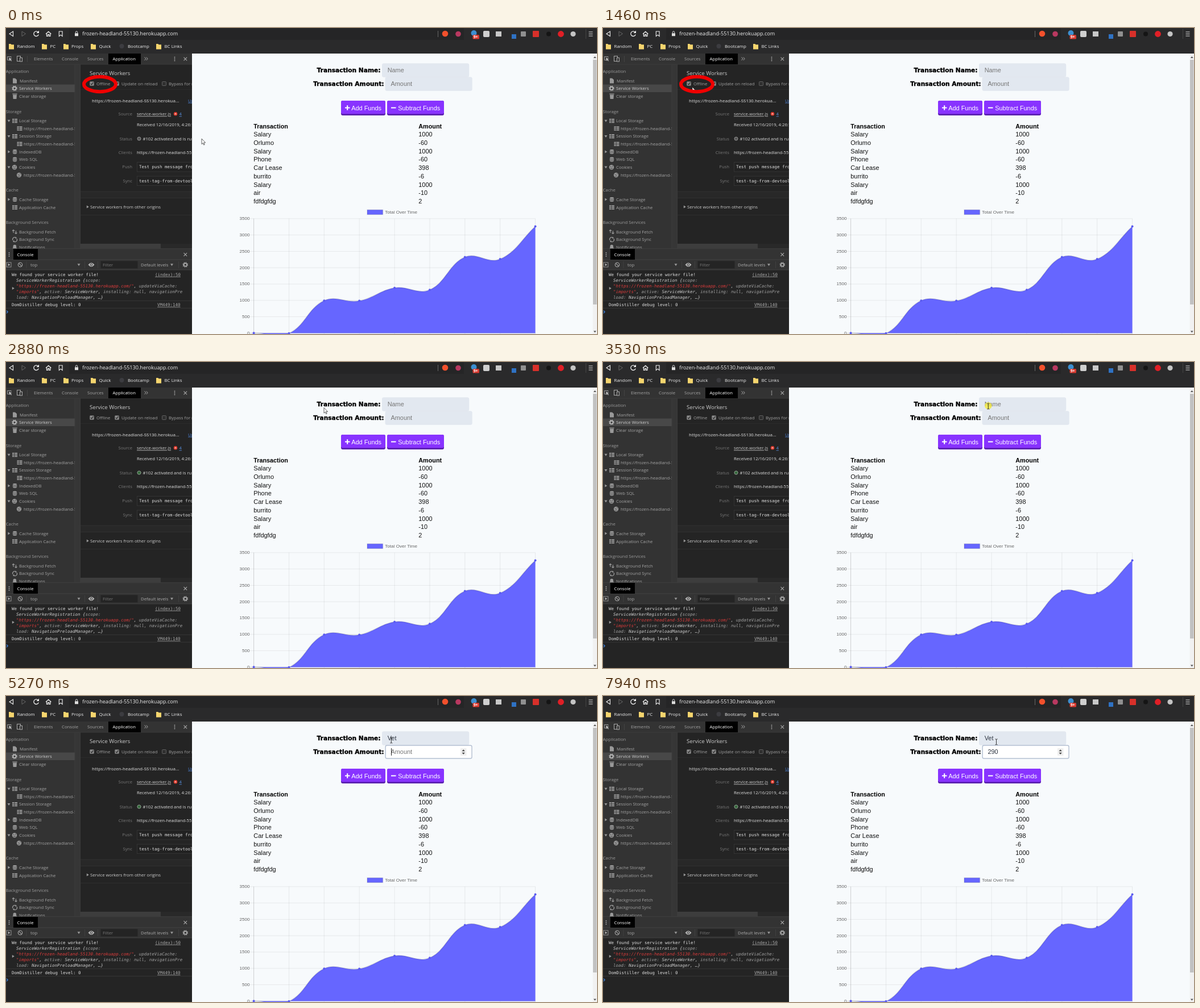
These frames come from a looping animation (1039 px wide and 539 px high, 8000 ms). An HTML page:

```html
<!DOCTYPE html>
<html lang="en">
<head>
<meta charset="utf-8">
<title>Budget tracker offline</title>
<style>
html, body { margin: 0; width: 100%; height: 100%; overflow: hidden; background: #f7fafc; }
svg { display: block; width: 1039px; height: 539px; }
text { font-family: "Open Sans", "Noto Sans", sans-serif; white-space: pre; }
.page { font-family: "Liberation Sans", Arial, sans-serif; }
.label { font-family: "DejaVu Sans", Verdana, sans-serif; font-weight: bold; }
.mono { font-family: "DejaVu Sans Mono", monospace; }
.it { font-style: italic; }
.key { fill: #a0a0a0; }
.str { fill: #dc3c3c; }
.b { font-weight: bold; }
</style>
</head>
<body>
<svg id="stage" viewBox="0 0 1039 539"></svg>
<script>
const stage = document.getElementById('stage');
const side = '#333';
let out = '';
const add = s => { out += s; };
const rect = (x, y, w, h, fill, more = '') =>
  add(`<rect x="${x}" y="${y}" width="${w}" height="${h}" fill="${fill}" ${more}/>`);
const dot = (x, y, r, fill, more = '') =>
  add(`<circle cx="${x}" cy="${y}" r="${r}" fill="${fill}" ${more}/>`);
const line = (d, color, w = 1, more = '') =>
  add(`<path d="${d}" fill="none" stroke="${color}" stroke-width="${w}" ${more}/>`);
const shape = (d, fill, more = '') => add(`<path d="${d}" fill="${fill}" ${more}/>`);
// y is the middle of the line of text
const text = (x, y, s, fill = '#9a9a9a', size = 7.8, more = '') =>
  add(`<text x="${x}" y="${(y + size * .35).toFixed(2)}" fill="${fill}" font-size="${size}" ${more}>${s}</text>`);
const page = (x, y, s, fill = '#111', more = '', size = 10.9) => text(x, y, s, fill, size, `class="page" ${more}`);
const mono = (x, y, s, fill = '#ccc', more = 'class="mono"') => text(x, y, s, fill, 7.47, more);
const down = (x, y, c = '#999') => shape(`M${x - 2.5} ${y - 1.7}h5l-2.5 4z`, c);
const right = (x, y, c = '#999') => shape(`M${x - 1.7} ${y - 2.5}v5l4-2.5z`, c);
const cross = (x, y, r = 2.8, c = '#aaa', w = 1.1) =>
  line(`M${x - r} ${y - r}l${2 * r} ${2 * r}m0 ${-2 * r}l${-2 * r} ${2 * r}`, c, w);
const dots = (x, y) => [-3, 0, 3].forEach(d => dot(x, y + d, .9, '#aaa'));
const gear = (x, y, c) => {
  dot(x, y, 2.7, 'none', `stroke="${c}" stroke-width="1.7"`);
  dot(x, y, 4.1, 'none', `stroke="${c}" stroke-width="1.3" stroke-dasharray="1.6 1.62"`);
};
const grid = (x, y) => {
  rect(x - 4.5, y - 3.7, 9, 7.4, '#999');
  line(`M${x - 4.5} ${y - 1.2}h9m-9 2.6h9M${x - .8} ${y - 3.7}v7.4`, side, .8);
};
const disk = (x, y) => {
  rect(x - 3.7, y - 4, 7.4, 8, '#999', 'rx="2.4"');
  line(`M${x - 3.7} ${y - 1.4}q3.7 1.6 7.4 0m-7.4 2.6q3.7 1.6 7.4 0`, side, .7);
};
const cookie = (x, y) => {
  dot(x, y, 4.2, '#999');
  [[-1.5, -1], [1, 1.6], [1.6, -1.8], [-1.2, 2]].forEach(([a, b]) => dot(x + a, y + b, .8, side));
};

function browser() {
  rect(0, 0, 1039, 45, '#2a2a2b');
  rect(111, 0, 694, 21, '#252526');
  line('M12.5 6v8.5L6 10.2z', '#eee', 1.1);
  line('M28 6v8.5l6.5-4.3z', '#666', 1);
  line('M56.5 7.5A4.3 4.3 0 1 0 57.2 11.5', '#eee', 1.3);
  shape('M58 4.5v4.4h-4.4z', '#eee');
  line('M70 10.5l4.7-4.3 4.7 4.3M71.5 10v4.3h2.2v-3h2v3h2.2V10', '#eee', 1.2);
  line('M93.3 6h5.8v8.5l-2.9-2.4-2.9 2.4z', '#eee', 1.1);
  rect(121, 9.2, 6, 5, '#ddd');
  line('M122.3 9V7.5a1.7 1.7 0 0 1 3.4 0V9', '#ddd', 1);
  text(134.3, 10.3, 'frozen-headland-55130.herokuapp.com', '#eee', 9.1);
  line('M759.5 5v11', '#666');
  dot(772, 10, 5.3, '#f2502c');
  dot(795, 10.5, 4.8, '#b83860');
  dot(822.5, 9, 5, '#3c8fd0');
  rect(820.5, 12, 11.5, 7.5, '#d93a30', 'rx="1.5"');
  text(822, 15.8, '9+', '#fff', 6.5, 'class="b"');
  rect(839, 5, 11, 11, '#cfcfcf', 'rx="2"');
  rect(861, 6, 10, 9, '#c8c8c8');
  rect(889, 11, 8, 8, '#2f72c4');
  rect(905, 6, 9, 9, '#909090', 'rx="1"');
  rect(926, 5, 11, 11, '#d8302a', 'rx="1"');
  dot(954, 10.5, 4, '#151515');
  dot(975.5, 10.5, 5.4, '#e01f26');
  dot(997, 10.5, 4.6, '#c4c4c4');
  line('M1019.5 2v17', '#444');
  line('M1024.5 7h7m-7 3.5h7m-7 3.5h7', '#ddd', 1.2);
  [['Random', 19.5, 5], ['PC', 77.5, 63], ['Props', 115, 101], ['Quick', 163.5, 149],
   ['Bootcamp', 214, 0], ['BC Links', 278.5, 264]].forEach(([s, x, f]) => {
    text(x, 32.3, s, '#eee', 7.9);
    if (f) shape(`M${f} 28h3.5l1 1.2h4.5v8.3h-9z`, '#f5d56e');
    else dot(203.5, 32, 4, '#3c3c40');
  });
}

function sidebar() {
  rect(0, 45, 327, 494, '#242424');
  rect(0, 64, 121, 325, side);
  rect(0, 99.5, 121, 13.5, '#484848');
  [['Application', 76.5], ['Storage', 147], ['Cache', 285.7], ['Background Services', 342.5]]
    .forEach(([s, y]) => text(-.3, y, s));
  [['Manifest', 24, 93], ['Service Workers', 23, 106.3, '#ccc'], ['Clear storage', 23, 120],
   ['Local Storage', 23, 163.5], ['Session Storage', 23, 190.7], ['IndexedDB', 23, 218],
   ['Web SQL', 23, 231.5], ['Cookies', 23, 245.3], ['Cache Storage', 23, 302],
   ['Application Cache', 23, 316], ['Background Fetch', 23, 359], ['Background Sync', 23, 372.7],
   ['Notifications', 23, 386.3]].forEach(([s, x, y, c]) => text(x, y, s, c || '#a2a2a2', 7.75));
  [177, 204.3, 259].forEach(y => text(31, y, 'https://frozen-headland-55130', '#a2a2a2'));
  [163.5, 190.7, 245.3].forEach(y => down(5, y));
  [218, 302].forEach(y => right(5, y));
  [163.5, 190.7, 316].forEach(y => grid(15.5, y));
  [177, 204.3].forEach(y => grid(24, y));
  [218, 231.5, 302].forEach(y => disk(15.5, y));
  cookie(15, 245.3);
  cookie(23, 259);
  shape('M12 88.5h4l3 2.8v6.2h-7z', '#999');
  gear(15, 106.3, '#bbb');
  shape('M12 117.5h7l-.6 7.5h-5.8zM11.3 115.5h8.4v1.2h-8.4z', '#999');
  line('M13 361v-5.5m-2 2l2-2 2 2M17.5 357v5.5m-2-2l2 2 2-2', '#999', 1.1);
  line('M12 374a3.5 3.5 0 0 1 5-4.6M18.8 371a3.5 3.5 0 0 1-5 4.8', '#999', 1.2);
  shape('M16.6 367.5v4l2.3-2zM14.2 373.8v4l-2.3-2z', '#999');
  shape('M11.5 389v-1l1-1.5v-2a2.8 2.8 0 0 1 5.6 0v2l1 1.5v1z', '#999');
}

function workers() {
  rect(121, 64, 9.5, 325, '#363636');
  rect(130.5, 64, 197, 325, '#242424');
  line('M121 64v325M130.5 64v325', '#414141', .8);
  rect(0, 45, 327, 19, '#333');
  line('M0 64h327', '#3d3d3d', .8);
  line('M9 56.5H2.5v-6H9v2', '#aaa', .9);
  shape('M5 52l5.5 2.8-2.3.7 2 2.3-1 .8-1.9-2.3-1.2 2z', '#bbb');
  rect(19.5, 49.5, 6, 9, 'none', 'stroke="#aaa"');
  rect(24.5, 52.5, 4, 6.5, '#333', 'stroke="#aaa"');
  line('M37.5 49v11', '#4a4a4a', .8);
  rect(180, 45, 57, 19, '#000');
  [['Elements', 49], ['Console', 98], ['Sources', 143], ['Application', 187.5, '#fff']]
    .forEach(([s, x, c]) => text(x, 54.7, s, c || '#a4a4a4', 7.75));
  line('M243.5 51.5l2.5 2.7-2.5 2.7m3.2-5.4l2.5 2.7-2.5 2.7', '#aaa', 1);
  dots(296.5, 54.5);
  cross(315.3, 54.5);

  text(147, 79.5, 'Service Workers', '#ccc', 9.6);
  [[147, 'Offline', 1], [191, 'Update on reload', 1], [274, 'Bypass for network']].forEach(([x, s, on]) => {
    rect(x + .5, 94.5, 7, 7, on ? '#8a8a8a' : '#303030', 'rx="1" stroke="#777" stroke-width=".7"');
    if (on) line(`M${x + 2} 98l1.6 1.8 2.8-4`, '#1e1e1e', 1.1);
    text(x + 12, 98.5, s, '#a0a0a0');
  });
  line('M131 108.5h196', '#2f2f2f', .7);
  text(151, 128, 'https://frozen-headland-55130.herokua...', '#b4b4b4', 7.75, 'font-weight="600"');
  text(320, 128, 'Update', '#4a7fd0', 7.8, 'text-decoration="underline"');
  [['Source', 151.7], ['Status', 195.3], ['Clients', 219.5], ['Push', 244.3], ['Sync', 269]]
    .forEach(([s, y]) => text(222, y, s, '#777', 7.7, 'text-anchor="end"'));
  text(230, 151.7, 'service-worker.js', '#ccc', 7.7, 'text-decoration="underline"');
  dot(298, 151.3, 3.2, '#e0392b');
  cross(298, 151.3, 1.2, '#fff', .8);
  text(304.5, 151.7, '4', '#5b94e6', 7.8, 'text-decoration="underline"');
  text(230, 170.5, 'Received 12/16/2019, 4:26:10 PM', '#ddd', 7.7);
  dot(234, 195, 3, '#555', 'stroke="#999" stroke-width=".9"');
  dot(234, 195, 3, '#35683c', 'id="live" stroke="#8a9c8c" stroke-width=".9"');
  text(240.5, 195.3, '#102 activated and is running', '#ddd', 7.7);
  text(230, 219.5, 'https://frozen-headland-55130', '#ddd', 7.7);
  [['Test push message from', 244.7], ['test-tag-from-devtools', 269.3]].forEach(([s, y]) => {
    rect(230.5, y - 8.2, 110, 16.5, '#222', 'stroke="#383838" stroke-width=".8"');
    mono(234, y, s, '#ddd');
  });
  rect(131, 288, 196, 11.5, '#282828');
  line('M131 288h196m-196 11.5h196M131 329.5h196', '#333', .8);
  right(143.5, 315);
  text(148, 315.7, 'Service workers from other origins', '#ccc', 7.72);
  rect(131, 380, 196, 8.5, '#292929');
  rect(131, 380, 141, 8.5, '#3d3d3d');
}

function devConsole() {
  rect(0, 388.5, 327, 37.5, '#333');
  rect(0, 426, 327, 113, '#242424');
  line('M0 388.7h327M0 408h327M0 426h327', '#444', .8);
  dots(5.5, 399);
  rect(13, 389, 43, 19, '#000');
  text(19.5, 399, 'Console', '#fff', 7.75);
  cross(315.3, 399);
  rect(1, 413, 8, 8, 'none', 'stroke="#999" stroke-width=".9"');
  shape('M3.8 414.7v4.6l3.5-2.3z', '#bbb');
  dot(25, 417, 3.7, 'none', 'stroke="#aaa" stroke-width="1.1"');
  line('M22.4 414.4l5.2 5.2', '#aaa', 1.1);
  text(43, 417, 'top', '#aaa');
  down(128, 417);
  line('M36 411v12M138.5 411v12M161.5 411v12M303.5 411v12', '#444', .8);
  shape('M144.5 417q5.5-7 11 0q-5.5 7-11 0z', '#bbb');
  dot(150, 417, 1.9, '#bbb', 'stroke="#333" stroke-width="1"');
  rect(166.5, 410.5, 65, 13, '#242424');
  text(170, 417.3, 'Filter', '#777');
  text(237, 417, 'Default levels', '#aaa', 7.75);
  down(291.5, 417);
  gear(315.3, 417, '#aaa');

  const it = 'class="mono it"', under = 'class="mono" text-decoration="underline"';
  mono(10, 434.3, 'We found your service worker file!', '#ddd');
  mono(262, 434.3, '(index):50', '#aaa', under);
  right(12.5, 458.5);
  mono(18, 444.3, 'ServiceWorkerRegistration {<tspan class="key">scope:</tspan>', '#ccc', it);
  mono(18, 454.3, '<tspan class="str">"https://frozen-headland-55130.herokuapp.com/"</tspan>, <tspan class="key">updateViaCache:</tspan>', '#ccc', it);
  mono(18, 464.3, '<tspan class="str">"imports"</tspan>, <tspan class="key">active:</tspan> ServiceWorker, <tspan class="key">installing: null, navigationPre</tspan>', '#ccc', it);
  mono(18, 474.3, '<tspan class="key">load:</tspan> NavigationPreloadManager, …}', '#ccc', it);
  line('M0 480.5h327M0 493.5h327', '#3a3a3a', .8);
  mono(10, 487.5, 'DomDistiller debug level: 0', '#ddd');
  mono(266, 487.5, 'VM449:140', '#aaa', under);
  line('M1 497.8l2.2 2.3L1 502.4', '#3f8cf0', 1.2);
}

function tracker() {
  rect(327, 45, 712, 494, '#f7fafc');
  rect(1031.5, 45, 7.5, 494, '#f1f1f1');
  rect(1032, 56, 6.5, 431, '#c1c1c1');
  shape('M1032.8 53h5l-2.5-3zM1032.8 533.5h5l-2.5 3z', '#555');
  const bold = 'class="label" text-anchor="end" stroke="#000" stroke-width=".35"';
  text(658.5, 74.2, 'Transaction Name:', '#000', 10.65, bold);
  text(664.5, 98.2, 'Transaction Amount:', '#000', 10.65, bold);
  const field = 'rx="2.6" stroke-width="1.4"';
  rect(661.7, 63, 151.8, 23, '#e2e8f0', `id="nameBox" ${field}`);
  rect(667.2, 87, 151.8, 23, '#e2e8f0', `id="amountBox" ${field}`);
  page(670.7, 74.3, '', '#757575', 'id="nameText"');
  page(676.5, 98.3, '', '#757575', 'id="amountText"');
  add('<g id="spinner">');
  rect(799, 92, 10.5, 13, '#efefef');
  shape('M801.5 97.3h5.4l-2.7-3zM801.5 99.7h5.4l-2.7 3z', '#444');
  add('</g>');
  rect(0, 68, 1, 13, '#222', 'id="nameCaret"');
  rect(0, 92, 1, 13, '#222', 'id="amountCaret"');

  [[589, 78], [670, 100]].forEach(([x, w]) => {
    rect(x, 128, w, 26, '#5a20b0', 'rx="3"');
    rect(x, 128, w, 23.3, '#8833ff', 'rx="3"');
  });
  line('M596 140.5h8.5M600.2 136.3v8.5M677 140.5h8.5', '#fff', 2);
  page(607.3, 140.7, 'Add Funds', '#fff');
  page(689.3, 140.7, 'Subtract Funds', '#fff');

  page(435.3, 172.8, 'Transaction', '#000', 'font-weight="bold"', 10.8);
  page(725.3, 172.8, 'Amount', '#000', 'font-weight="bold"', 10.8);
  const rows = [['Salary', 1000], ['Orlumo', -60], ['Salary', 1000], ['Phone', -60], ['Car Lease', 398],
    ['burrito', -6], ['Salary', 1000], ['air', -10], ['fdfdgfdg', 2]];
  rows.forEach(([name, sum], i) => {
    page(435.3, 187.4 + 14.74 * i, name);
    page(725.3, 187.4 + 14.74 * i, sum);
  });
  chart(rows.map(r => r[1]).reverse());
}

function chart(sums) {
  const X = i => 435.6 + 61.87 * i, Y = v => 537.4 - v * .0576;
  rect(635, 320.3, 27.5, 8.3, '#6666ff', 'stroke="#000" stroke-opacity=".1" stroke-width="1.6"');
  page(666.3, 324.3, 'Total Over Time', '#666', '', 8.1);
  for (let v = 0; v <= 3500; v += 500) {
    page(428.5, Y(v) - .4, v, '#666', 'text-anchor="end"', 8.1);
    line(`M429 ${Y(v)}H930.5`, '#000', .7, `opacity="${v ? .1 : .25}"`);
  }
  sums.forEach((_, i) => line(`M${X(i)} 335.7V539`, '#000', .7, `opacity="${i ? .1 : .25}"`));
  let total = 0;
  const pts = sums.map((s, i) => [X(i), Y(total += s)]);
  // control points of a cardinal spline with tension .4
  const ctrl = pts.map((p, i) => {
    const a = pts[i - 1] || p, b = pts[i + 1] || p;
    const da = Math.hypot(p[0] - a[0], p[1] - a[1]), db = Math.hypot(b[0] - p[0], b[1] - p[1]);
    const at = k => [p[0] + k * (b[0] - a[0]), p[1] + k * (b[1] - a[1])];
    return [at(-.4 * da / (da + db)), at(.4 * db / (da + db))];
  });
  let d = 'M' + pts[0];
  for (let i = 1; i < pts.length; i++) d += `C${ctrl[i - 1][1]} ${ctrl[i][0]} ${pts[i]}`;
  shape(`${d}V${Y(0)}H${X(0)}z`, '#6666ff');
  line(d, '#000', 2, 'opacity=".1"');
  pts.forEach(([x, y]) => dot(x, y, 2, '#5a5af0'));
}

const arrow = 'M0 0V9.6L2.2 7.6 3.7 11 5.2 10.4 3.7 7H6.6Z';
const resize = 'M-6 0l3-3v2.2h6V-3l3 3-3 3V.8h-6V3z';
const beam = 'M-2-5q2 0 2 1q0-1 2-1M0-4V4M-2 5q2 0 2-1q0 1 2 1';

function overlays() {
  const look = 'fill="#fff" stroke="#222" stroke-width=".7"';
  add(`<g id="before"><path id="cursorA" ${look}/>`);
  add('<ellipse cx="165" cy="99" rx="28" ry="13.2" fill="none" stroke="#f00000" stroke-width="6"/></g>');
  dot(677.3, 77.2, 6.2, '#f2e83a', 'id="click" opacity=".8"');
  add(`<path id="cursorB" ${look}/>`);
}

browser();
sidebar();
workers();
devConsole();
tracker();
overlays();
stage.innerHTML = out;

const $ = id => document.getElementById(id);
const set = (id, attrs) => { for (const k in attrs) $(id).setAttribute(k, attrs[k]); };
const show = (id, on) => set(id, { visibility: on ? 'visible' : 'hidden' });
const latest = (list, t) => list.filter(e => e[0] <= t).pop()[1];
const clamp = v => Math.min(1, Math.max(0, v));

const pathA = [[0, 344, 195], [30, 344, 195], [150, 325, 190], [420, 325, 190], [1060, 159, 109],
  [1240, 177, 106.5], [1270, 177, 106.5], [1460, 157, 104]];
const pathB = [[0, 341, 104], [2090, 341, 104], [2190, 352, 102], [2400, 352, 102], [2630, 558, 80.5],
  [2850, 558, 80.5], [3430, 677.3, 78], [7939, 677.3, 78], [7940, 691.5, 80.8]];
const nameTyped = [[0, ''], [4420, 'V'], [4620, 'Ve'], [4770, 'Vet']];
const amountTyped = [[0, ''], [6860, '2'], [7170, '29'], [7420, '290']];
const nameCaret = [[0, 0], [3580, 671], [4080, 0], [4420, 677.5], [4620, 683.5], [4770, 686.5], [5270, 0]];
const amountCaret = [[0, 0], [5270, 677], [5770, 0], [6320, 677], [6810, 0], [6860, 682.7],
  [7170, 688.7], [7420, 694.5], [7940, 0]];

function along(path, t) {
  const i = path.findIndex(p => p[0] > t);
  if (i < 0) return path[path.length - 1].slice(1);
  const a = path[i - 1], b = path[i], u = (t - a[0]) / (b[0] - a[0]), e = u * u * (3 - 2 * u);
  return [a[1] + (b[1] - a[1]) * e, a[2] + (b[2] - a[2]) * e];
}

function field(id, hint, typed, caret, focus, t) {
  const value = latest(typed, t), x = latest(caret, t);
  $(id + 'Text').textContent = value || hint;
  set(id + 'Text', { fill: value ? '#2d3440' : '#757575' });
  set(id + 'Box', { fill: focus ? '#fff' : '#e2e8f0', stroke: focus ? '#b4c0d2' : '#e2e8f0' });
  set(id + 'Caret', { x });
  show(id + 'Caret', x);
}

function draw(t) {
  const fade = clamp((t - 1690) / 400);
  const [ax, ay] = along(pathA, t), [bx, by] = along(pathB, t);
  const overField = bx > 661;
  set('before', { opacity: 1 - fade });
  set('live', { opacity: fade });
  set('cursorA', { d: t > 110 && t < 450 ? resize : arrow, transform: `translate(${ax} ${ay})` });
  set('cursorB', {
    d: overField ? beam : arrow, transform: `translate(${bx} ${by})`, opacity: fade,
    fill: overField ? 'none' : '#fff', 'stroke-width': overField ? .9 : .7
  });
  show('click', t >= 3480 && t < 3580);
  field('name', 'Name', nameTyped, nameCaret, t >= 3580 && t < 5270, t);
  field('amount', 'Amount', amountTyped, amountCaret, t >= 5270, t);
  show('spinner', t >= 5270);
}

const start = performance.now();
function tick() {
  draw((performance.now() - start) % 8000);
  requestAnimationFrame(tick);
}
tick();
</script>
</body>
</html>
```
